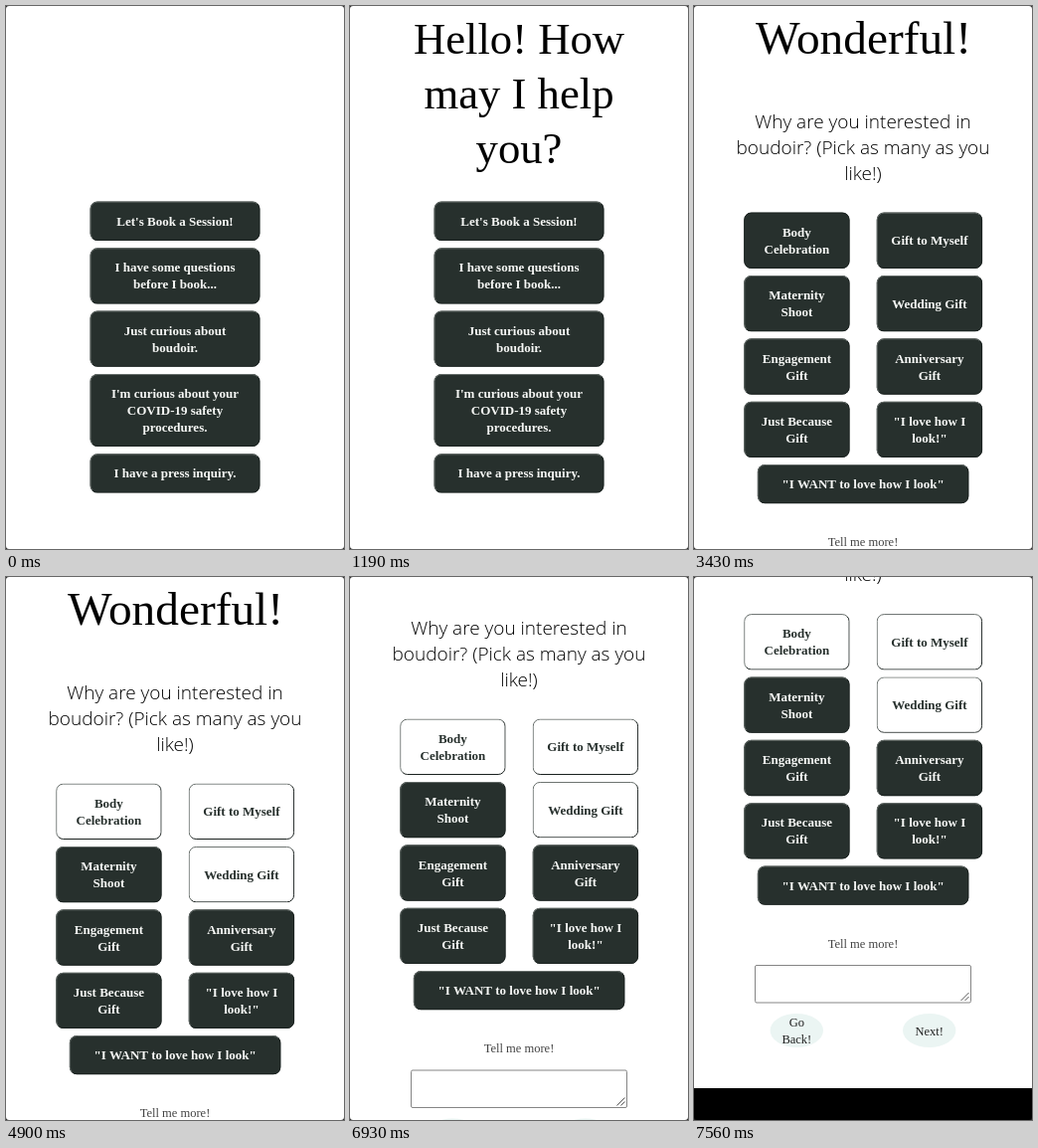
Recreate the animation shown at these times as an HTML page with a canvas. Size 340 by 546 pixels, loop 8 s.

```html
<!DOCTYPE html>
<html lang="en">
<head>
<meta charset="utf-8">
<title>Booking questions</title>
<style>
  html, body { margin: 0; width: 100%; height: 100%; overflow: hidden; background: #fff; }
  canvas { display: block; width: 340px; height: 546px; }
</style>
</head>
<body>
<canvas id="stage"></canvas>
<script>
const W = 340, H = 546, LOOP = 8000, STEP = 70;
const SERIF = '"Liberation Serif", "Times New Roman", serif';
const GREETING = `44.7px ${SERIF}`;
const TITLE = `47.3px ${SERIF}`;
const LABEL = `bold 13px ${SERIF}`;
const NOTE = `12.5px ${SERIF}`;
const LEAD = '300 19px "Open Sans", "Noto Sans", sans-serif';
const INK = '#27302d', EDGE = '#1b2220';
const PAGE_END = 684.5;

const canvas = document.getElementById('stage');
const ctx = canvas.getContext('2d');
const scale = window.devicePixelRatio || 1;
canvas.width = W * scale;
canvas.height = H * scale;

const menu = [
  { y: 196.5, h: 39.5, lines: ["Let's Book a Session!"] },
  { y: 243.3, h: 56.3, lines: ['I have some questions', 'before I book...'], press: 2310, hold: 2 * STEP },
  { y: 306.5, h: 56.3, lines: ['Just curious about', 'boudoir.'] },
  { y: 370, h: 73, lines: ["I'm curious about your", 'COVID-19 safety', 'procedures.'] },
  { y: 450.3, h: 39.3, lines: ['I have a press inquiry.'] },
].map(b => ({ x: 84.5, w: 171, ...b }));

const reasons = [
  { lines: ['Body', 'Celebration'], press: 3430 },
  { lines: ['Gift to Myself'], press: 4830 },
  { lines: ['Maternity', 'Shoot'] },
  { lines: ['Wedding Gift'], press: 4130 },
  { lines: ['Engagement', 'Gift'] },
  { lines: ['Anniversary', 'Gift'] },
  { lines: ['Just Because', 'Gift'] },
  { lines: ['"I love how I', 'look!"'] },
].map((b, i) => ({
  x: i % 2 ? 183.7 : 50.2, y: 207.6 + 63.35 * (i >> 1), w: 106.4, h: 56.4, ...b,
}));
reasons.push({ x: 63.8, y: 461, w: 212.6, h: 39.3, lines: ['"I WANT to love how I look"'] });

// Scroll distance at each step of the drag, with rubber-banding past the end
const DRAG_START = 6720;
const drag = [0, 6, 30, 65, 96, 120, 137, 149, 157, 163, 167, 169.5, 170.5];

const clamp = (v, lo, hi) => Math.min(hi, Math.max(lo, v));

function text(lines, x, y, lead, font, color) {
  ctx.font = font;
  ctx.fillStyle = color;
  lines.forEach((line, i) => ctx.fillText(line, x, y + i * lead));
}

function roundRect(x, y, w, h, r) {
  ctx.beginPath();
  ctx.roundRect(x, y, w, h, r);
}

// Two-tone border, split along the corner diagonals
function bevel({ x, y, w, h }, light, dark) {
  const k = Math.min(w, h) / 2;
  const half = (color, cornerX, cornerY) => {
    ctx.save();
    ctx.beginPath();
    ctx.moveTo(x, y + h);
    ctx.lineTo(x + k, y + h - k);
    ctx.lineTo(x + w - k, y + k);
    ctx.lineTo(x + w, y);
    ctx.lineTo(cornerX, cornerY);
    ctx.clip();
    roundRect(x + 0.5, y + 0.5, w - 1, h - 1, 7);
    ctx.strokeStyle = color;
    ctx.lineWidth = 1;
    ctx.stroke();
    ctx.restore();
  };
  half(light, x, y);
  half(dark, x + w, y + h);
}

function button(b, t) {
  const held = t >= b.press && t < b.press + (b.hold ?? STEP);
  const picked = t >= b.press && !held;
  roundRect(b.x, b.y, b.w, b.h, 7.5);
  ctx.fillStyle = picked ? '#fff' : INK;
  ctx.fill();
  bevel(b, held ? EDGE : '#666d6a', EDGE);
  const top = b.y + b.h / 2 + 4.5 - (b.lines.length - 1) * 8.5;
  text(b.lines, b.x + b.w / 2, top, 17, LABEL, picked ? INK : '#f6f7f5');
}

function oval(x, y, lines) {
  ctx.beginPath();
  ctx.ellipse(x, y, 26.7, 17, 0, 0, Math.PI * 2);
  ctx.fillStyle = '#ebf5f3';
  ctx.fill();
  text(lines, x, y + 4.5 - (lines.length - 1) * 8.5, 17, NOTE, '#222');
}

function textarea(x, y, w, h) {
  roundRect(x, y, w, h, 1.5);
  ctx.strokeStyle = '#858585';
  ctx.lineWidth = 1;
  ctx.stroke();
  ctx.beginPath();
  for (const d of [8, 4]) {
    ctx.moveTo(x + w - 2 - d, y + h - 2);
    ctx.lineTo(x + w - 2, y + h - 2 - d);
  }
  ctx.strokeStyle = '#555';
  ctx.stroke();
}

function menuPage(t) {
  ctx.globalAlpha = clamp((t - 140) / 1050, 0, 1);
  text(['Hello! How', 'may I help', 'you?'], 170, 47.5, 55, GREETING, '#000');
  ctx.globalAlpha = 1;
  menu.forEach(b => button(b, t));
}

function reasonPage(t) {
  const step = clamp(Math.round((t - DRAG_START) / STEP), 0, drag.length - 1);
  ctx.save();
  ctx.translate(0, -drag[step]);
  text(['Wonderful!'], 170.5, 47.5, 0, TITLE, '#000');
  text(['Why are you interested in', 'boudoir? (Pick as many as you', 'like!)'],
    170, 122.5, 26, LEAD, '#000');
  reasons.forEach(b => button(b, t));
  text(['Tell me more!'], 170, 543, 0, NOTE, '#444');
  textarea(61.5, 561, 217, 37.5);
  oval(103.3, 626.5, ['Go', 'Back!']);
  oval(236.7, 626.5, ['Next!']);
  ctx.fillStyle = '#000';
  ctx.fillRect(0, PAGE_END, W, 200);
  ctx.restore();
}

function corners() {
  ctx.beginPath();
  ctx.rect(0, 0, W, H);
  ctx.roundRect(0, 0, W, H, 3);
  ctx.fillStyle = '#222';
  ctx.fill('evenodd');
}

function draw(now) {
  const t = Math.floor((now % LOOP) / STEP) * STEP;
  ctx.setTransform(scale, 0, 0, scale, 0, 0);
  ctx.textAlign = 'center';
  ctx.fillStyle = '#fff';
  ctx.fillRect(0, 0, W, H);
  if (t < 2450) menuPage(t);
  else reasonPage(t);
  corners();
}

let start;
function tick(now) {
  start ??= now;
  draw(now - start);
  requestAnimationFrame(tick);
}
requestAnimationFrame(tick);
</script>
</body>
</html>
```
